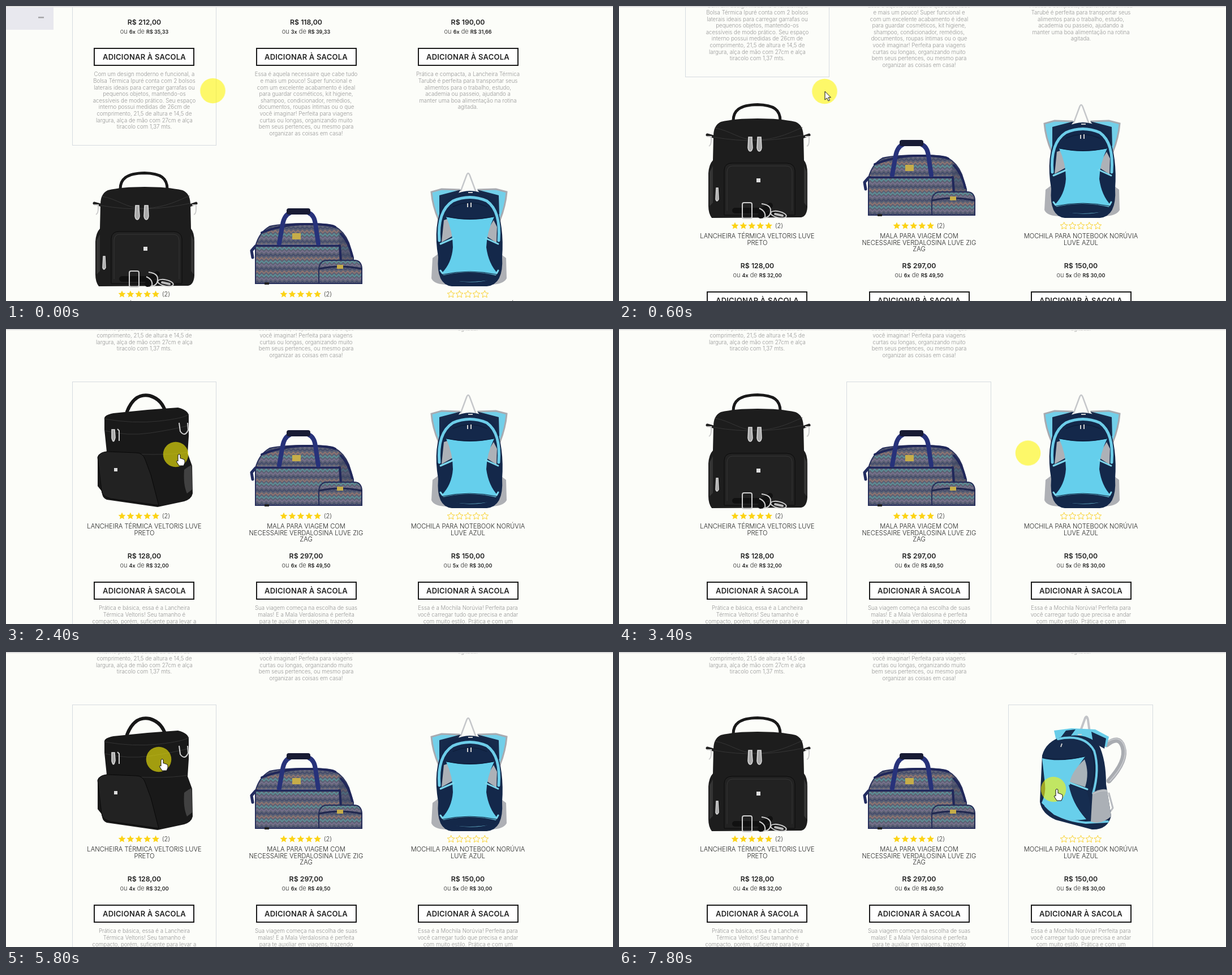
Recreate the animation shown at these times as an HTML page. Size 1073 by 522 pixels, loop 8 s.

```html
<!DOCTYPE html>
<html lang="pt-BR">
<head>
<meta charset="utf-8">
<title>Vitrine de bolsas</title>
<style>
html, body { margin: 0; width: 100%; height: 100%; overflow: hidden; background: #fcfdf9; }
svg { display: block; width: 1073px; height: 522px; }
text { font-family: Inter, "Open Sans", sans-serif; text-anchor: middle; fill: #222; }
.price { font-size: 12.3px; font-weight: 600; }
.part { font-size: 11px; font-weight: 300; fill: #333; }
.part tspan { font-size: 9px; font-weight: 600; fill: #222; }
.buy { font-size: 13px; font-weight: 600; letter-spacing: .22px; }
.name { font-size: 11.2px; font-weight: 300; fill: #222; }
.desc { font-size: 9.7px; font-weight: 300; fill: #959595; }
.count { font-size: 11px; font-weight: 300; fill: #333; }
.star { fill: #fcd315; }
.hollow { fill: none; stroke: #f8d02c; stroke-width: 1; }
.box { fill: none; stroke: #d6dbe0; }
.ln { fill: none; stroke-linecap: round; stroke-linejoin: round; }
.metal { fill: none; stroke: #cfcfcf; stroke-width: 2; }
.pull { fill: #a9a9a9; stroke: #dedede; stroke-width: 1.5; }

#page, #pointer, .anim { animation: 8s step-end -40ms infinite; }
#page { animation-name: scroll; }
#pointer { animation-name: move; }
#old { animation-name: old; }
#box0 { animation-name: box0; }
#box1 { animation-name: box1; }
#box2, #side2 { animation-name: on2; }
#front2 { animation-name: off2; }
#side0 { animation-name: on0; }
#front0 { animation-name: off0; }
#arrow { animation-name: arrow; }
#hand { animation-name: hand; }

@keyframes scroll {
  0% { transform: translateY(0); }
  2.5% { transform: translateY(-24px); }
  5% { transform: translateY(-72px); }
  7.5% { transform: translateY(-121px); }
  10% { transform: translateY(-160px); }
  12.5% { transform: translateY(-175px); }
  15%, 100% { transform: translateY(-179px); }
}
@keyframes move {
  0% { transform: translate(365.5px, 150px); }
  5% { transform: translate(363.5px, 151px); }
  15% { transform: translate(310px, 172px); }
  17.5% { transform: translate(261px, 190px); }
  20% { transform: translate(258px, 196px); }
  22.5% { transform: translate(259px, 205px); }
  25% { transform: translate(262px, 214px); }
  27.5% { transform: translate(275px, 220px); }
  30% { transform: translate(300px, 222px); }
  32.5% { transform: translate(346px, 222px); }
  35% { transform: translate(430px, 221px); }
  37.5% { transform: translate(520px, 221px); }
  40% { transform: translate(615px, 220px); }
  42.5% { transform: translate(723px, 219.5px); }
  45% { transform: translate(738px, 219.5px); }
  47.5% { transform: translate(741.5px, 219.5px); }
  62.5% { transform: translate(700px, 216px); }
  65% { transform: translate(580px, 209px); }
  67.5% { transform: translate(445px, 201px); }
  70% { transform: translate(335px, 194px); }
  72.5% { transform: translate(270px, 190px); }
  75% { transform: translate(256px, 188px); }
  77.5% { transform: translate(262px, 190px); }
  80% { transform: translate(310px, 195px); }
  82.5% { transform: translate(530px, 210px); }
  85% { transform: translate(786px, 221.5px); }
  90% { transform: translate(784px, 230px); }
  92.5% { transform: translate(775px, 238px); }
  95% { transform: translate(770px, 242px); }
  97.5%, 100% { transform: translate(768px, 243px); }
}
@keyframes old { 0% { opacity: 1; } 12.5%, 100% { opacity: 0; } }
@keyframes box0 { 0%, 35%, 87.5%, 100% { opacity: 0; } 15%, 70% { opacity: 1; } }
@keyframes box1 { 0%, 47.5%, 70%, 100% { opacity: 0; } 35%, 65% { opacity: 1; } }
@keyframes on0 { 0%, 35%, 82.5%, 100% { opacity: 0; } 17.5%, 70% { opacity: 1; } }
@keyframes off0 { 0%, 35%, 82.5%, 100% { opacity: 1; } 17.5%, 70% { opacity: 0; } }
@keyframes on2 { 0%, 65% { opacity: 0; } 47.5%, 90%, 100% { opacity: 1; } }
@keyframes off2 { 0%, 65% { opacity: 1; } 47.5%, 90%, 100% { opacity: 0; } }
@keyframes arrow { 0%, 15%, 100% { opacity: 0; } 5% { opacity: 1; } }
@keyframes hand { 0%, 42.5%, 85% { opacity: 0; } 15%, 47.5%, 90%, 100% { opacity: 1; } }
</style>
</head>
<body>
<svg viewBox="0 0 1073 522">
  <defs>
    <pattern id="zig" width="16" height="24" patternUnits="userSpaceOnUse">
      <rect width="16" height="24" fill="#5d6274"/>
      <g class="ln" stroke-width="2">
        <path d="M0 6 4 2 8 6 12 2 16 6" stroke="#8f7470"/>
        <path d="M0 12 4 8 8 12 12 8 16 12" stroke="#5c8f96"/>
        <path d="M0 18 4 14 8 18 12 14 16 18" stroke="#77708c"/>
        <path d="M0 24 4 20 8 24 12 20 16 24" stroke="#454c6c"/>
      </g>
    </pattern>
    <path id="star" d="M0-6.5 1.9-2.3 6.4-1.9 3 1.2 4 5.6 0 3.2-4 5.6-3 1.2-6.4-1.9-1.9-2.3Z"/>
  </defs>

  <g id="page">
    <rect width="84" height="42" fill="#e8e8ee"/>
    <rect x="57" y="19" width="10" height="2.5" fill="#a5a5a8"/>
    <g id="rows"></g>

    <g transform="translate(0 179)">
      <g id="front0" class="anim">
        <path class="ln" stroke="#191919" stroke-width="5" d="M202 145C202 128 212 117 245 116.5 274 117 285 126 285 145"/>
        <path class="ln" stroke="#222" stroke-width="5" d="M170 174 156 170M325 174 336 170"/>
        <path class="metal" stroke="#777" d="M155 173h8v6q0 9-4 11M329 173h7v7q0 9-4 10"/>
        <path fill="#1d1d1d" d="M167 172Q167 153 180 147 205 141 245 141T312 147Q325 152 326 171L327 215Q333 222 333 238V298Q332 314 322 316L164 317Q158 309 158 296V238Q159 222 166 215Z"/>
        <path fill="#343434" d="M160 236 166 225V290L160 296ZM332 236 327 225V290L332 296Z"/>
        <path class="ln" stroke="#363636" d="M170 158C196 162 214 179 240 179 278 179 300 167 324 157M168 174Q245 188 326 170"/>
        <path fill="#222" stroke="#0b0b0b" d="M186 312V232Q187 220 200 220H297Q310 221 311 233V312Z"/>
        <path class="ln" stroke="#363636" d="M191 304V235Q192 225 201 225H295Q305 225 306 235V304"/>
        <path class="pull" d="M229 174h6v6l1 13q-1 6-4 6t-4-6ZM245 174h6l1 19q-1 6-4 6t-4-6ZM172 264h3l1 20q-3 6-5 0Z"/>
        <rect x="243" y="247" width="7" height="7" fill="#dedede"/>
        <path class="ln" stroke="#111" stroke-width="10" d="M205 304h45q14-4 17-9M250 313l24-4"/>
        <rect class="metal" x="218" y="290" width="17" height="28" rx="3"/>
        <path class="metal" d="M252 292q17 2 16 13 0 11-13 12M248 300q12 5 10 16"/>
        <ellipse class="metal" cx="282" cy="311" rx="14" ry="5.5" transform="rotate(12 282 311)"/>
        <path class="ln" stroke="#bbb" stroke-width="4" d="M276 310l13 3"/>
      </g>

      <g id="side0" class="anim">
        <path class="ln" stroke="#171717" stroke-width="6" d="M214 146C224 121 238 115 254 118 271 123 278 134 283 149"/>
        <path fill="#191919" d="M174 158Q174 152 190 149L250 143 304 139Q323 144 323 154L323 190 321 220 329 242 330 291Q328 301 315 305L268 315 178 302Q169 298 170 288L162 278V226Q164 219 178 217L174 178Z"/>
        <path class="ln" stroke="#343434" d="M174 159Q225 168 270 163T323 151M175 180Q215 190 255 184T322 171M177 217Q220 222 260 222T321 218"/>
        <path fill="#222" stroke="#080808" d="M162 227Q166 217 180 217L230 219Q242 219 246 231L256 258 270 312 185 300Q169 296 169 286Z"/>
        <path fill="#414141" d="M315 249Q324 242 328 241L329 284 320 291Q313 276 315 249Z"/>
        <path class="pull" d="M187 178h5l1 14q-3 13-6 1Z"/>
        <path class="metal" d="M197 177l3 3v18M306 166l2 15q8 11 14-2l-1-13"/>
        <rect x="191" y="246" width="6" height="6" fill="#ddd"/>
      </g>

      <g>
        <path class="ln" stroke="#222c60" stroke-width="5" d="M441 246 434 254 436 266"/>
        <path fill="url(#zig)" stroke="#28305c" stroke-width="2" d="M441 312V246Q447 222 466 211 490 206 530 206T580 210Q598 220 606 240L614 266V312Z"/>
        <path fill="#3d4460" opacity=".5" d="M588 215Q600 224 606 240L614 266V311H590Z"/>
        <path class="ln" stroke="#20275a" stroke-width="4" d="M443 245H590M452 222Q490 207 530 207T582 212M590 245 592 272M592 224Q606 238 612 264"/>
        <path class="ln" stroke="#777d98" stroke-width="1" d="M446 243H587"/>
        <path class="ln" stroke="#27327a" stroke-width="8" stroke-linecap="butt" d="M483 241 489 207Q492 191 502 187M535 187Q545 191 547 207L552 241"/>
        <rect x="496" y="179" width="42" height="11" rx="4" fill="#181b34"/>
        <rect x="506" y="223" width="15" height="11" fill="#c6ad49"/>
        <rect x="457" y="310" width="8" height="4" fill="#222"/>
        <path fill="url(#zig)" stroke="#252d59" stroke-width="2" d="M553 312V285Q555 272 567 271H617Q628 272 629 285V312Z"/>
        <path class="ln" stroke="#20274f" stroke-width="3" d="M554 286Q590 278 628 286"/>
        <rect x="585" y="279" width="11" height="7" fill="#c6ad49"/>
      </g>

      <g id="front2" class="anim">
        <path class="ln" stroke="#c5c7ca" stroke-width="2.5" d="M804 148 814 121Q817 113 820 121L830 148"/>
        <path fill="#72cfe9" stroke="#a8abb1" stroke-width="3" d="M800 146 770 145 752 150Q754 175 765 200L780 172Z"/>
        <path fill="#72cfe9" stroke="#a8abb1" stroke-width="3" d="M836 146 866 145 885 150Q883 175 873 200L858 172Z"/>
        <path fill="#172a4b" d="M766 156 804 146 792 163 766 190ZM871 156 833 146 846 163 872 190Z"/>
        <path fill="#aeb0b5" d="M766 258 754 267 752 303Q757 314 780 314ZM872 258 884 267 885 303Q879 314 855 314Z"/>
        <path fill="#14284a" d="M774 169Q792 149 820 148 850 149 865 170 881 211 877 265 880 314 850 317H788Q760 314 764 265 754 208 774 169Z"/>
        <path class="ln" stroke="#6dcde9" stroke-width="5" d="M766 236Q762 184 790 166 820 153 850 166 875 184 871 236"/>
        <path fill="#adb1b7" d="M774 200 783 197 793 226 770 239ZM862 200 868 212 867 240 846 226Z"/>
        <path fill="#65cfec" d="M778 194Q820 204 863 194 850 220 849 248 853 277 869 294 845 310 820 309T770 294Q788 276 790 248 790 220 778 194Z"/>
        <path class="ln" stroke="#7cd7ed" stroke-width="3" d="M768 242 791 232M870 242 848 232M768 289Q778 307 820 308T870 289"/>
        <path class="ln" stroke="#0c1b36" d="M790 176Q820 162 850 176M779 194Q820 202 862 194M772 296Q820 286 867 296"/>
        <path fill="#142849" d="M770 298Q820 286 867 298L860 305Q820 313 778 305Z"/>
        <path class="metal" stroke-width="1.5" d="M816 170v7M822 169v8M817 151h8"/>
      </g>

      <g id="side2" class="anim">
        <path class="ln" stroke="#c2c4c8" stroke-width="4" d="M816 139 824 117Q827 111 829 120L832 142"/>
        <path class="ln" stroke="#a9acb1" stroke-width="9" d="M862 164Q884 146 891 168 899 192 866 228"/>
        <path class="ln" stroke="#c8cace" stroke-width="2" d="M862 160Q886 144 894 168 900 194 868 228"/>
        <path class="ln" stroke="#b8bbc0" stroke-width="3" d="M866 250 873 276 866 286"/>
        <path fill="#69cde9" d="M773 157 769 139 800 135 842 137 866 150 862 168 835 160Z"/>
        <path fill="#172b4c" d="M781 151 790 139 807 137 799 148ZM835 141 861 153 858 171 838 160Z"/>
        <path fill="#162a4b" d="M748 183Q755 158 783 150 826 141 848 164 861 190 861 234L870 290Q864 315 836 314L772 297Q747 286 744 265Z"/>
        <path class="ln" stroke="#6dcce8" stroke-width="4" d="M776 154Q823 144 840 175 850 208 838 250M754 272Q776 297 825 302L864 300"/>
        <path fill="#abb0b6" d="M837 249Q854 240 863 244L870 291Q851 307 834 300Z"/>
        <path class="ln" stroke="#d0d2d5" d="M838 251Q852 244 862 246"/>
        <path fill="#68cfeb" d="M748 188Q780 196 824 185 804 211 797 234 799 266 826 296 797 301 769 288L747 267Q755 250 753 234Z"/>
        <path fill="#a9b3b9" d="M823 190Q832 214 824 239L797 230Q801 210 823 190Z"/>
        <path fill="#162d50" d="M795 235 826 246Q836 268 833 299 803 276 795 235ZM746 228 752 235 752 253 745 263Z"/>
        <path class="ln" stroke="#78d6ec" stroke-width="3" d="M796 231 828 243"/>
        <path class="ln" stroke="#0b1b37" d="M750 187Q784 194 823 185M834 170Q847 205 835 239"/>
        <path class="metal" stroke-width="1.5" d="M783 162l-2 6M811 146h7"/>
      </g>
    </g>
  </g>

  <rect width="1073" height="1" fill="#cfcfd1"/>
  <rect y="1" width="1073" height="1.5" fill="#ebebea"/>

  <g id="pointer">
    <circle r="22.3" fill="#fdf609" opacity=".6"/>
    <path id="arrow" class="anim" fill="#fff" stroke="#111" d="M.5 0V15L4 11.8 6.5 17 9 15.8 6.5 10.8H11Z"/>
    <path id="hand" class="anim" fill="#fff" stroke="#111" d="M4 2Q4-.5 6-.5T8 2V7Q10 6 11 8 13 7 14 9 16 8.5 16 11V15L14 20H6L1.5 13Q1 10 4 12Z"/>
  </g>
</svg>

<script>
const rows = [
  [
    { price: "212,00", times: 6, part: "35,33", desc: "Com um design moderno e funcional, a|Bolsa Térmica Ipuré conta com 2 bolsos|laterais ideais para carregar garrafas ou|pequenos objetos, mantendo-os|acessíveis de modo prático. Seu espaço|interno possui medidas de 26cm de|comprimento, 21,5 de altura e 14,5 de|largura, alça de mão com 27cm e alça|tiracolo com 1,37 mts." },
    { price: "118,00", times: 3, part: "39,33", desc: "Essa é aquela necessaire que cabe tudo|e mais um pouco! Super funcional e|com um excelente acabamento é ideal|para guardar cosméticos, kit higiene,|shampoo, condicionador, remédios,|documentos, roupas íntimas ou o que|você imaginar! Perfeita para viagens|curtas ou longas, organizando muito|bem seus pertences, ou mesmo para|organizar as coisas em casa!" },
    { price: "190,00", times: 6, part: "31,66", desc: "Prática e compacta, a Lancheira Térmica|Tarubé é perfeita para transportar seus|alimentos para o trabalho, estudo,|academia ou passeio, ajudando a|manter uma boa alimentação na rotina|agitada." }
  ],
  [
    { name: "LANCHEIRA TÉRMICA VELTORIS LUVE|PRETO", votes: 2, price: "128,00", times: 4, part: "32,00", desc: "Prática e básica, essa é a Lancheira|Térmica Veltoris! Seu tamanho é|compacto, porém, suficiente para levar a" },
    { name: "MALA PARA VIAGEM COM|NECESSAIRE VERDALOSINA LUVE ZIG|ZAG", votes: 2, price: "297,00", times: 6, part: "49,50", desc: "Sua viagem começa na escolha de suas|malas! E a Mala Verdalosina é perfeita|para te auxiliar em viagens, trazendo" },
    { name: "MOCHILA PARA NOTEBOOK NORÚVIA|LUVE AZUL", votes: 0, price: "150,00", times: 5, part: "30,00", desc: "Essa é a Mochila Norúvia! Perfeita para|você carregar tudo que precisa e andar|com muito estilo. Prática e com um" }
  ]
];

const text = (cls, x, y, s) => `<text class="${cls}" x="${x}" y="${y}">${s}</text>`;
const lines = (cls, x, y, s) =>
  s.split("|").map((line, i) => text(cls, x, y + i * 11.63, line)).join("");

function stars(x, y, votes) {
  const start = x - (votes ? 39.5 : 29.8);
  let out = votes ? text("count", x + 38.5, y + 4, `(${votes})`) : "";
  for (let i = 0; i < 5; i++)
    out += `<use href="#star" class="${votes ? "star" : "hollow"}" x="${start + i * 14.9}" y="${y}"/>`;
  return out;
}

function card(c, col, row) {
  const x = 244.5 + col * 286, y = row * 552;
  const left = Math.round(156.4 + col * 286.2);
  const box = row
    ? `<rect id="box${col}" class="box anim" x="${[117.5, 402.5, 688.5][col]}" y="272.5" width="${col ? 255 : 254}" height="527"/>`
    : col ? "" : `<rect id="old" class="box anim" x="117.5" y="-280.5" width="254" height="527"/>`;
  return box +
    (c.name ? stars(x, 510, c.votes) + lines("name", x, 532, c.name) : "") +
    text("price", x, y + 32.5, `R$ ${c.price}`) +
    text("part", x, y + 49, `ou <tspan>${c.times}x</tspan> de <tspan>R$ ${c.part}</tspan>`) +
    `<rect x="${left}" y="${y + 75}" width="176" height="30" fill="#fff" stroke="#1c1c1c" stroke-width="2"/>` +
    text("buy", x, y + 94.7, "ADICIONAR À SACOLA") +
    lines("desc", x, y + 124.3, c.desc);
}

document.getElementById("rows").innerHTML =
  rows.map((r, row) => r.map((c, col) => card(c, col, row)).join("")).join("");
</script>
</body>
</html>
```
